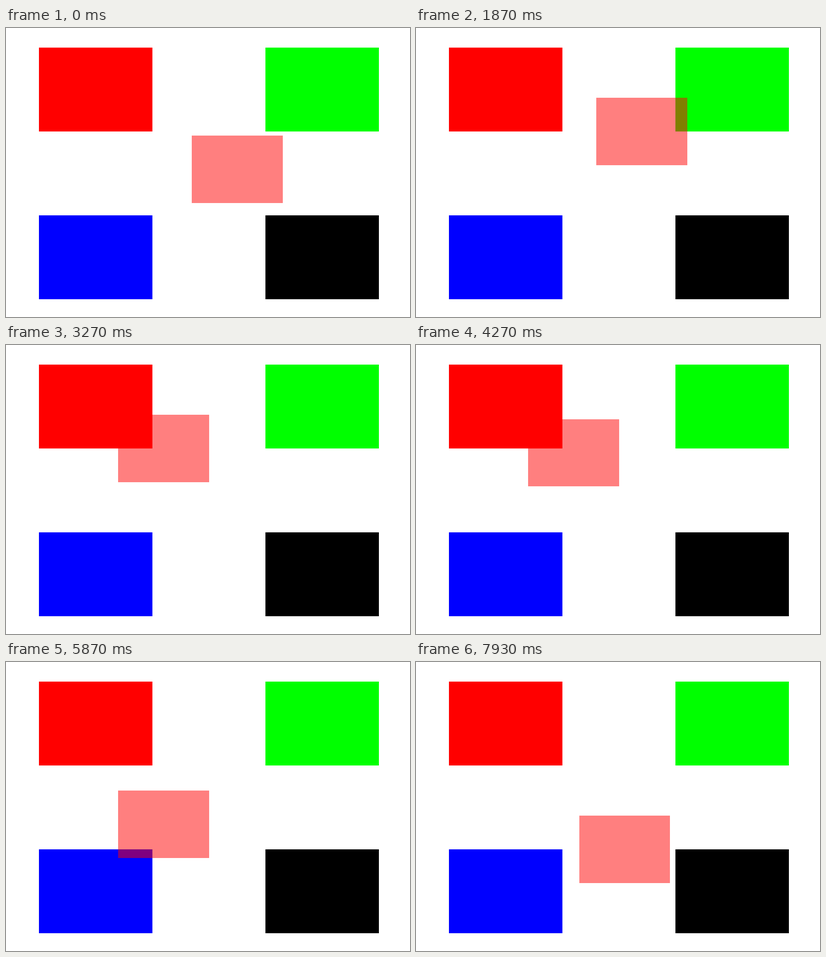
These frames come from a looping animation (883 by 634 pixels, 8000 ms). An HTML page without scripts:

```html
<!DOCTYPE html>
<html lang="en">
<head>
<meta charset="utf-8">
<title>Moving rectangle</title>
<style>
@property --x { syntax: "<number>"; inherits: false; initial-value: 0; }
@property --y { syntax: "<number>"; inherits: false; initial-value: 9; }

html, body {
  margin: 0;
  width: 100%;
  height: 100%;
  overflow: hidden;
  background: #fff;
}
body { position: relative; }

.block, .mover { position: absolute; }
.block { width: 248px; height: 184px; }
.left { left: 72px; }
.right { left: 567px; }
.top { top: 43px; }
.bottom { top: 411px; }
.red { background: #f00; }
.green { background: #0f0; }
.blue { background: #00f; }
.black { background: #000; }

/* The mover sits on a grid of 12.38 by 9.205 px cells. */
.mover {
  left: calc(406.25px + var(--x) * 12.38px);
  top: calc(153.32px + var(--y) * 9.205px);
  width: 198.76px;
  height: 147.6px;
  background: rgba(255, 0, 0, .5);
  animation: walk-x 8s step-end -3.5ms infinite, walk-y 8s step-end -3.5ms infinite;
}

/* Held-key runs: one cell per tick, with a missed tick between runs. */
@keyframes walk-x {
  0% { --x: 0; }
  23.333% { --x: -1; }
  29.167% { --x: -2; }
  30.833% { --x: -2; animation-timing-function: steps(3, start); }
  33.333% { --x: -5; }
  34.167% { --x: -5; animation-timing-function: steps(5, start); }
  38.333% { --x: -10; }
  39.167% { --x: -10; animation-timing-function: steps(3, start); }
  41.667% { --x: -13; }
  85.833% { --x: -12; }
  91.667% { --x: -12; animation-timing-function: steps(2, start); }
  93.333% { --x: -10; }
  94.167% { --x: -10; animation-timing-function: steps(4, start); }
  97.5% { --x: -6; }
  98.333% { --x: -6; animation-timing-function: steps(2, start); }
  100% { --x: -4; }
}

@keyframes walk-y {
  0% { --y: 9; }
  2.5% { --y: 9; animation-timing-function: steps(2, start); }
  4.167% { --y: 7; }
  5% { --y: 7; animation-timing-function: steps(4, start); }
  8.333% { --y: 3; }
  9.167% { --y: 3; animation-timing-function: steps(3, start); }
  11.667% { --y: 0; }
  53.333% { --y: 1; }
  60% { --y: 1; animation-timing-function: steps(4, start); }
  63.333% { --y: 5; }
  64.167% { --y: 5; animation-timing-function: steps(4, start); }
  67.5% { --y: 9; }
  68.333% { --y: 9; animation-timing-function: steps(4, start); }
  71.667% { --y: 13; }
  72.5% { --y: 14; }
  74.167% { --y: 16; }
  75% { --y: 17; }
  76.667% { --y: 17; animation-timing-function: steps(3, start); }
  79.167% { --y: 20; }
  100% { --y: 20; }
}
</style>
</head>
<body>
<div class="block left top red"></div>
<div class="block right top green"></div>
<div class="block left bottom blue"></div>
<div class="block right bottom black"></div>
<div class="mover"></div>
</body>
</html>
```
